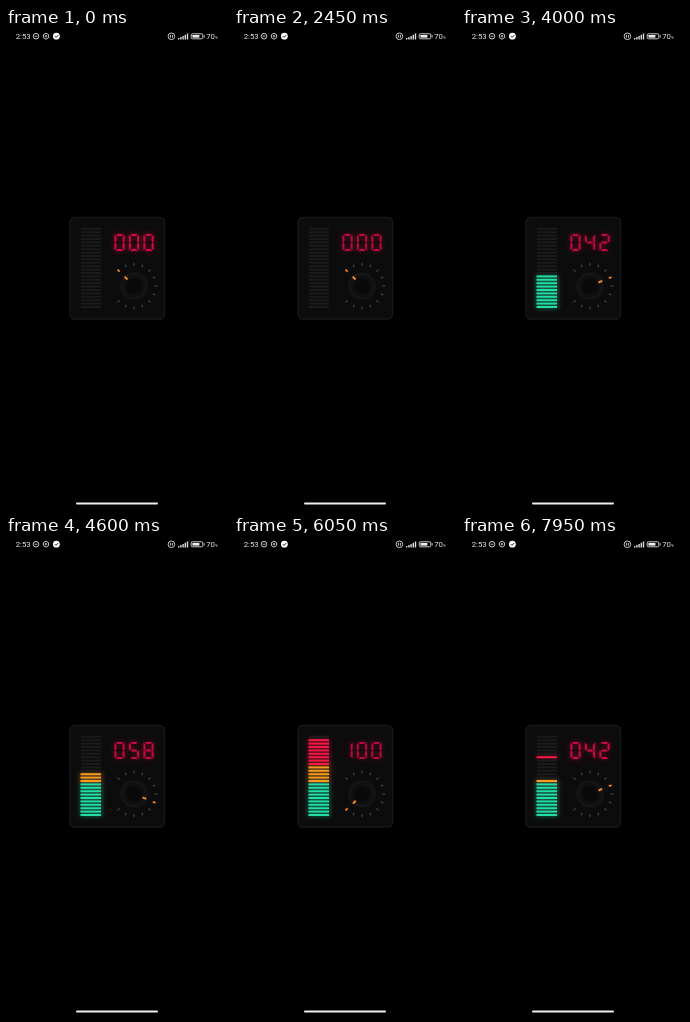
Animation of 222 by 480 pixels, one loop 8000 ms. Source, as an HTML page:

```html
<!DOCTYPE html>
<html lang="en">
<head>
<meta charset="utf-8">
<title>Volume meter</title>
<style>
html, body { margin: 0; width: 100%; height: 100%; overflow: hidden; background: #000; }
svg { display: block; width: 222px; height: 480px; }
text { font-family: Roboto, sans-serif; fill: #e8e8e8; }
</style>
</head>
<body>
<svg id="stage" viewBox="0 0 222 480">
  <defs>
    <radialGradient id="knobFill">
      <stop offset="0" stop-color="#080808"/>
      <stop offset=".65" stop-color="#0e0e0e"/>
      <stop offset="1" stop-color="#171717"/>
    </radialGradient>
    <filter id="soft" x="-100%" y="-100%" width="300%" height="300%"><feGaussianBlur stdDeviation="2.6"/></filter>
  </defs>
  <rect width="222" height="480"/>
  <g id="status">
    <text x="9.7" y="11" font-size="7.8">2:53</text>
    <g fill="none" stroke="#ddd" stroke-width=".9">
      <circle cx="30" cy="8.2" r="2.8"/><path d="M28.6 8.2h2.8"/>
      <path d="M40 5.2l2.6 1.5v3L40 11.2l-2.6-1.5v-3z"/><circle cx="40" cy="8.2" r=".8"/>
      <circle cx="165.4" cy="8.3" r="3.3"/><path d="M164.4 6.9v2.8M166.4 6.9v2.8"/>
      <rect x="185.2" y="5.8" width="11.6" height="5" rx="1.2"/><path d="M198.2 7.2v2.2"/>
    </g>
    <circle cx="50.4" cy="8.2" r="3.4" fill="#fff"/>
    <path d="M48.8 8.2l1.2 1.2 2.2-2.3" fill="none" stroke="#000" stroke-width=".9"/>
    <path d="M172 11.5v-1.5h1.4v1.5zm2.2 0v-2.5h1.4v2.5zm2.2 0v-3.6h1.4v3.6zm2.2 0v-4.8h1.4v4.8zm2.2 0v-6h1.4v6z" fill="#ddd"/>
    <rect x="186.4" y="7" width="7" height="2.6" fill="#eee"/>
    <text x="200.2" y="11" font-size="7.8">70</text>
    <text x="209" y="11" font-size="4">%</text>
  </g>
  <rect x="64" y="189.5" width="94.5" height="101.5" rx="4.5" fill="#0c0c0c" stroke="#171717" stroke-width="1.4"/>
  <g id="glow" filter="url(#soft)" opacity=".6"></g>
  <g id="meter"></g>
  <g id="display"></g>
  <g id="ticks"></g>
  <circle cx="128" cy="258" r="13.6" fill="url(#knobFill)"/>
  <circle cx="128" cy="258" r="7.5" fill="#0a0a0a"/>
  <g id="pointer"><path d="M128 248.8v-4" stroke="#f58a22" stroke-width="2"/></g>
  <rect x="70" y="474.6" width="82" height="2" rx="1" fill="#eee"/>
</svg>
<script>
const LOOP = 8000, BARS = 24, STEPS = 12;
// [time, knob position]
const MOVES = [
  [2750, 1], [2900, 2], [3060, 3], [3420, 4], [3720, 5], [4080, 6], [4520, 7],
  [5250, 8], [5420, 9], [5600, 10], [5790, 11], [5980, 12],
  [6700, 11], [7000, 10], [7200, 9], [7360, 8], [7510, 7], [7670, 6], [7840, 5]
];
const $ = id => document.getElementById(id);
function add(parent, tag, attrs) {
  const el = document.createElementNS('http://www.w3.org/2000/svg', tag);
  for (const name in attrs) el.setAttribute(name, attrs[name]);
  return parent.appendChild(el);
}

const barColor = k => k < 10 ? '#20dfa6' : k < 15 ? '#f79a1e' : '#fb1745';
const bars = Array.from({ length: BARS }, (_, k) => {
  const box = { x: 75, y: 278 - k * 3.4, width: 20, height: 2 };
  return {
    glow: add($('glow'), 'rect', { ...box, x: 74, width: 22, fill: barColor(k) }),
    off: add($('meter'), 'rect', { ...box, fill: '#1b1b1b' }),
    on: add($('meter'), 'rect', { ...box, x: 74.5, width: 20.5, fill: barColor(k) })
  };
});

const angleOf = step => -45 + step * 22.5;
const ticks = Array.from({ length: STEPS + 1 }, (_, i) =>
  add($('ticks'), 'path', { d: 'M128 237.7v-3', transform: `rotate(${angleOf(i)} 128 258)` }));

// Segments a to g of one digit
const SEGMENTS = [
  'M2 1h7.4l-1.6 2h-4.2z', 'M10.8 1.6v7.2l-1 .6-1-1.2V3.8z', 'M10.8 17.4v-7.2l-1-.6-1 1.2v4.4z',
  'M2 18h7.4l-1.6-2h-4.2z', 'M.6 17.4v-7.2l1-.6 1 1.2v4.4z', 'M.6 1.6v7.2l1 .6 1-1.2V3.8z',
  'M2.4 9.5l1-1h4.6l1 1-1 1H3.4z'
];
const GLYPHS = ['abcdef', 'bc', 'abdeg', 'abcdg', 'bcfg', 'acdfg', 'acdefg', 'abc', 'abcdefg', 'abcdfg'];
const lamp = add($('display'), 'g', { filter: 'url(#soft)' });
const face = add($('display'), 'g', {});
const digits = [107.8, 122.3, 136.8].map(x => {
  const transform = `translate(${x} 205)`;
  const halo = add(lamp, 'g', { transform }), front = add(face, 'g', { transform });
  return SEGMENTS.map(d => ({
    halo: add(halo, 'path', { d, fill: '#e8004a', stroke: '#e8004a' }),
    front: add(front, 'path', { d })
  }));
});

function showNumber(value) {
  String(value).padStart(3, '0').split('').forEach((char, i) => digits[i].forEach((segment, s) => {
    const lit = GLYPHS[char].includes('abcdefg'[s]);
    segment.halo.setAttribute('opacity', lit ? 1 : 0);
    segment.front.setAttribute('fill', lit ? '#d80846' : '#21070e');
  }));
}

function stateAt(time) {
  let step = 0, level = 0, angle = angleOf(0);
  for (const [start, next] of MOVES) {
    if (time < start) break;
    const age = time - start, direction = Math.sign(next - step);
    const part = Math.min(1, age / 100);
    angle = angleOf(step) + (angleOf(next) - angleOf(step)) * (1 - (1 - part) ** 2);
    // Bars follow the knob one at a time
    level = 2 * step + direction * ((age >= 60) + (age >= 140));
    step = next;
  }
  const peak = time < 6120 ? level : BARS - Math.max(0, Math.floor((time - 7100) / 135));
  return { step, level, angle, peak };
}

function draw(now) {
  const time = now % LOOP;
  const { step, level, angle, peak } = stateAt(time);
  bars.forEach((bar, k) => {
    const lit = k < level || k === peak - 1 ? 1 : 0;
    bar.on.setAttribute('opacity', lit);
    bar.glow.setAttribute('opacity', lit);
  });
  ticks.forEach((tick, i) => {
    tick.setAttribute('stroke', i === step ? '#f5832a' : '#4b4b4b');
    tick.setAttribute('stroke-width', i === step ? 1.8 : 1);
  });
  $('pointer').setAttribute('transform', `rotate(${angle} 128 258)`);
  showNumber(Math.round(step * 100 / STEPS));
  const flicker = Math.cos(Math.floor(time / 50) * 2.1);
  face.setAttribute('opacity', .91 + .07 * flicker);
  lamp.setAttribute('opacity', .34 + .06 * flicker);
}

const begin = performance.now();
function frame() {
  draw(performance.now() - begin);
  requestAnimationFrame(frame);
}
frame();
</script>
</body>
</html>
```
